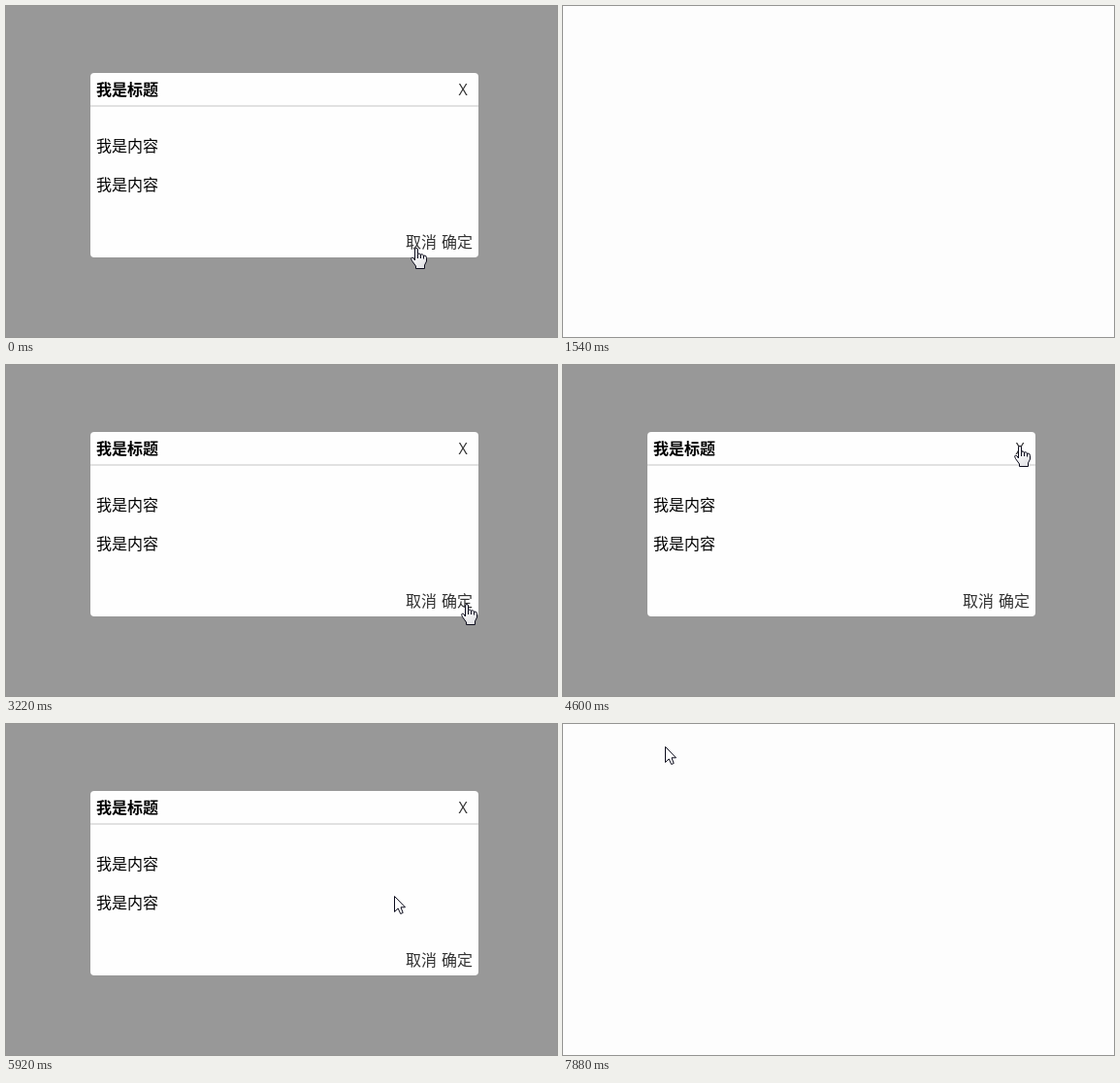
An HTML page with a canvas for the animation above (8000 ms loop, 568 by 341 pixels).

```html
<!DOCTYPE html>
<html lang="zh-CN">
<head>
<meta charset="utf-8">
<title>弹出框</title>
<style>
html, body { margin: 0; width: 100%; height: 100%; overflow: hidden; background: #fdfdfd; }
canvas { display: block; }
</style>
</head>
<body>
<canvas id="stage" width="568" height="341"></canvas>
<script>
const ctx = document.getElementById('stage').getContext('2d', { alpha: false });
const LOOP = 8000;
const CJK = '"Noto Sans CJK SC", "Noto Sans CJK", sans-serif';
const INK = '#0c0c1c';

// Spans in which the dialog is open
const openSpans = [[0, 670], [2130, 4750], [5920, 7760]];

// Pointer: start time, shape, left, top
const pointer = [
  [0, 'hand', 417, 249], [150, 'hand', 423, 247], [270, 'hand', 428, 245],
  [520, 'arrow', 432, 245], [1390, 'arrow', 221, 171], [1540, 'none', 0, 0],
  [2410, 'arrow', 295, 85], [2530, 'arrow', 366, 137], [2650, 'arrow', 429, 186],
  [2800, 'hand', 434, 235], [2950, 'arrow', 482, 246],
  [3100, 'hand', 472, 246], [3220, 'hand', 469, 246],
  [3840, 'arrow', 479, 157], [3990, 'arrow', 479, 108],
  [4140, 'hand', 470, 84], [4450, 'hand', 469, 83], [4600, 'hand', 465, 83],
  [4750, 'arrow', 469, 83], [5180, 'arrow', 263, 43], [5330, 'none', 0, 0],
  [5920, 'arrow', 400, 177], [6070, 'arrow', 416, 197], [6190, 'arrow', 436, 220],
  [6310, 'hand', 447, 236], [6460, 'hand', 468, 242],
  [7460, 'hand', 453, 243], [7610, 'hand', 427, 243],
  [7760, 'arrow', 431, 243], [7880, 'arrow', 105, 23]
];

const arrowPath = new Path2D('M.5 .5V16.5L4.2 13L6.7 18.5L9.2 17.5L7 11.8H11.5Z');
const handPath = new Path2D(
  'M4.5 13V2Q4.5 .5 6 .5T7.5 2V6.5Q9.2 5.2 10.5 7Q12.2 6 13.5 8Q16.5 7.5 16.5 10.5' +
  'V14L14.5 18V21.5H5.5V19L1.5 13.5Q-.3 10.5 1.5 10Q2.8 9.8 4.5 13Z');
const knuckles = new Path2D('M7.5 6.5V11M10.5 7V11M13.5 8V11.5');

const handFill = ctx.createLinearGradient(4, 6, 17, 20);
handFill.addColorStop(0, '#fefefe');
handFill.addColorStop(1, '#dedee2');

function text(str, x, y, font, color = '#000') {
  ctx.font = font;
  ctx.fillStyle = color;
  ctx.fillText(str, x, y);
}

function drawDialog() {
  ctx.fillStyle = '#989898';
  ctx.fillRect(0, 0, 568, 341);
  ctx.fillStyle = '#fefefe';
  ctx.beginPath();
  ctx.roundRect(87, 69, 400, 190, 4);
  ctx.fill();
  ctx.fillStyle = '#e1e1e1';
  ctx.fillRect(87, 102, 400, 2);

  text('我是标题', 93, 92, 'bold 16px ' + CJK);
  text('X', 466.5, 92, '16px "Open Sans", sans-serif', '#333');
  for (const y of [150, 190]) text('我是内容', 93, y, '16px ' + CJK);
  text('取消', 412, 249, '16px ' + CJK, '#333');
  text('确定', 449, 249, '16px ' + CJK, '#333');
}

function drawPointer(shape, x, y) {
  if (shape === 'none') return;
  const isHand = shape === 'hand';
  const path = isHand ? handPath : arrowPath;
  ctx.save();
  ctx.translate(x, y);
  ctx.fillStyle = isHand ? handFill : '#fefefe';
  ctx.strokeStyle = INK;
  ctx.lineWidth = 1;
  ctx.fill(path);
  ctx.stroke(path);
  if (isHand) ctx.stroke(knuckles);
  ctx.restore();
}

function draw(t) {
  ctx.fillStyle = '#fdfdfd';
  ctx.fillRect(0, 0, 568, 341);
  if (openSpans.some(([from, to]) => t >= from && t < to)) drawDialog();
  const [, shape, x, y] = pointer.findLast(key => key[0] <= t);
  drawPointer(shape, x, y);
}

const start = performance.now();
function tick() {
  draw((performance.now() - start) % LOOP);
  requestAnimationFrame(tick);
}
tick();
</script>
</body>
</html>
```
